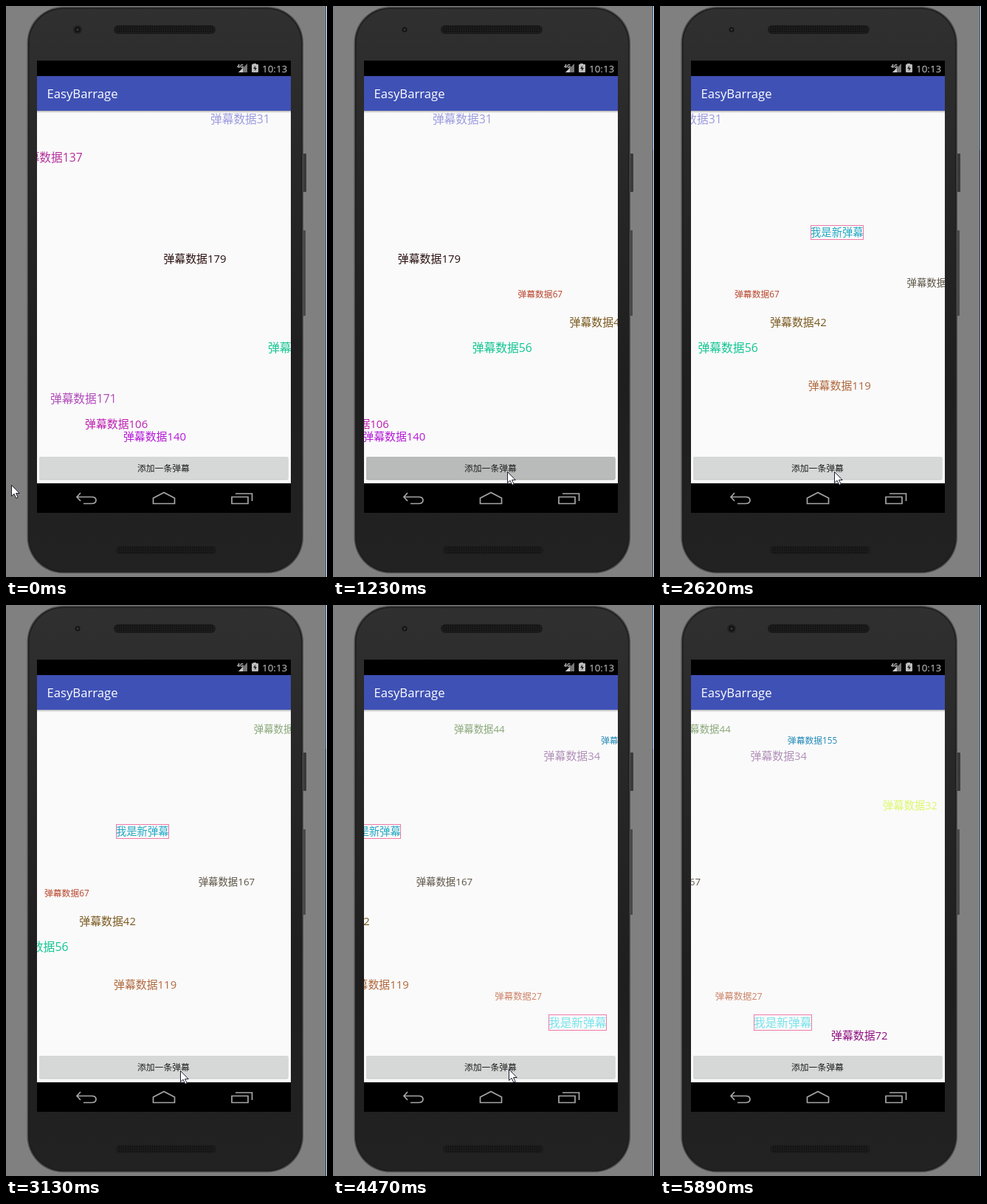
An HTML page with a canvas for the animation above (5.99 s loop, 435x774 px).

```html
<!DOCTYPE html>
<html lang="zh">
<head>
<meta charset="utf-8">
<style>
html, body { margin: 0; width: 435px; height: 774px; overflow: hidden; background: #808080; }
canvas { display: block; }
</style>
</head>
<body>
<canvas id="stage" width="435" height="774"></canvas>
<script>
const ctx = document.getElementById('stage').getContext('2d');
const LOOP = 5990;
const FONT = '"Open Sans", "Noto Sans CJK SC", "Noto Sans CJK", sans-serif';

const HOLDS = [[0, 1], [120, 7], [1090, 1], [1230, 1], [1390, 5], [2050, 1], [2200, 1],
  [2360, 6], [3130, 1], [3270, 1], [3390, 1], [3510, 3], [3900, 1], [4050, 3],
  [4470, 1], [4620, 7], [5590, 1], [5730, 1], [5890, 1], [LOOP, 1]];

// Left edge of a comment by its age: fast at first, then steady
const TRACK = [[0, 386], [300, 335.5], [590, 292], [1067, 227], [1637, 164],
  [2010, 127], [3057, 27], [5057, -158]];

const POINTER = [[0, 7, 649], [120, 7, 649], [1000, 236, 631], [4050, 236, 631],
  [4470, 238, 629], [5300, 238, 629], [5590, 300, 697], [5730, 380, 780]];

// [number, birth, centre y, size, colour]
const COMMENTS = [
  [137, -3198, 205, 15.7, '#b5309a'], [171, -2712, 532, 15.7, '#b04ab8'],
  [106, -2219, 566, 14.9, '#bc1eb0'], [140, -1688, 583, 14.9, '#b41ad8'],
  [179, -1190, 342, 14.9, '#2a1010'], [31, -700, 153, 15.7, '#9c9ce0'],
  [56, -184, 463, 15.8, '#12c592'], [67, 335, 391, 11.8, '#b8452c'],
  [42, 830, 428, 14.9, '#7a5a20'], [119, 1312, 514, 14.9, '#b0683c'],
  [167, 2310, 375, 13.4, '#5e5648'], [44, 2832, 168, 13.4, '#8aa87a'],
  [27, 3334, 530, 12.4, '#cc8468'], [34, 3833, 204, 14.9, '#b090b8'],
  [155, 4333, 184, 11.8, '#2288b8'], [72, 4860, 583, 14.9, '#901080'],
  [32, 5367, 272, 14.3, '#dcf86a'],
  ['', 1342, 307, 14.3, '#22a8c4'], ['', 3880, 566, 15.7, '#78e4ec']];

function lerpKeys(keys, t, col = 1) {
  let i = 1;
  while (i < keys.length - 1 && keys[i][0] < t) i++;
  const a = keys[i - 1], b = keys[i];
  const p = Math.min(1, (t - a[0]) / (b[0] - a[0]));
  return a[col] + (b[col] - a[col]) * p;
}

function heldTime(t) {
  const i = HOLDS.findIndex(h => h[0] > t) - 1;
  const [start, steps] = HOLDS[i];
  const len = (HOLDS[i + 1][0] - start) / steps;
  return start + Math.floor((t - start) / len) * len;
}

function rect(x, y, w, h, fill) {
  ctx.fillStyle = fill;
  ctx.fillRect(x, y, w, h);
}

function round(x, y, w, h, r, fill) {
  ctx.fillStyle = fill;
  ctx.beginPath();
  ctx.roundRect(x, y, w, h, r);
  ctx.fill();
}

function circle(x, y, r, fill) {
  ctx.fillStyle = fill;
  ctx.beginPath();
  ctx.arc(x, y, r, 0, 7);
  ctx.fill();
}

function text(str, x, y, size, fill) {
  ctx.font = `${size}px ${FONT}`;
  ctx.fillStyle = fill;
  ctx.fillText(str, x, y);
}

function line(path, color, width) {
  ctx.strokeStyle = color;
  ctx.lineWidth = width;
  ctx.stroke(new Path2D(path));
}

function vertical(y0, y1, ...colors) {
  const g = ctx.createLinearGradient(0, y0, 0, y1);
  colors.forEach((c, i) => g.addColorStop(i / (colors.length - 1), c));
  return g;
}

function speaker(x, y, w, h) {
  round(x, y, w, h, h / 2, '#1b1b1b');
  for (let i = 4; i < w - 4; i += 3)
    for (let j = 2; j < h - 2; j += 3) rect(x + i, y + j, 1, 1, '#050505');
}

function phone(ring) {
  rect(0, 0, 435, 774, '#808080');
  rect(433, 0, 1, 774, '#33557f');
  if (!ring) rect(433, 195, 1, 579, '#1d3450');
  rect(434, 0, 1, 774, '#e8eef5');
  round(402, 200, 5, 52, 1, '#3a3a3a');
  round(402, 304, 4, 116, 1, '#484848');
  round(28.5, 1, 374.5, 768, 49, '#4c4c4d');
  round(30, 2.5, 371.5, 765, 47.5, '#1c1c1c');
  round(31.5, 4, 368.5, 762, 46, vertical(0, 770, '#303031', '#262626', '#1e1e1e', '#222223'));
  if (ring) circle(97, 32, 6, '#222');
  circle(97, 32, ring ? 4 : 3.5, '#141414');
  circle(97, 32, 1.5, '#39393b');
  speaker(146, 26, 138, 12);
  speaker(149, 732, 136, 11);
}

function screen(pressed) {
  rect(42, 74, 344, 613, '#000');
  rect(42, 142, 344, 505, '#fafafa');
  rect(42, 95, 344, 47, '#3f51b5');
  rect(42, 142, 344, 3, vertical(142, 145, '#b0b0b0', '#fafafa'));
  text('EasyBarrage', 55.4, 125, 16.7, '#fff');
  text('10:13', 347, 89.5, 13.4, '#c8c8c8');

  ctx.fillStyle = '#777';
  ctx.fill(new Path2D('M315 90H327V78Z'));
  ctx.fillStyle = '#ccc';
  ctx.fill(new Path2D('M315 90H321V84Z'));
  ctx.font = `bold 7px ${FONT}`;
  ctx.fillText('4G', 313, 84);
  rect(335, 78, 4, 2, '#bbb');
  round(333, 79, 9, 11, 1, '#bbb');
  ctx.fillStyle = '#222';
  ctx.fill(new Path2D('M338 81L335 85H337V88L340 84H338Z'));

  round(45, 611.5, 337.5, 31, 2, pressed ? '#a5a6a6' : '#c8c9c9');
  round(45, 611, 337.5, 30.5, 2, pressed ? '#b9bbba' : '#d6d7d7');
  text('添加一条弹幕', 178, 631, 11.8, '#202020');

  line('M101 660L96 665.5L101 671M96 665.5H116Q122 665.5 122 670T116 674.5H105', '#a6a6a6', 1.7);
  line('M199.5 674.5V667L214 659.5L228.5 667V674.5Z', '#a6a6a6', 1.7);
  line('M306 665.5H328V674.5H306ZM311 661H333.5V671', '#a6a6a6', 1.7);
}

function comments(t) {
  ctx.save();
  ctx.beginPath();
  ctx.rect(42, 142, 344, 504);
  ctx.clip();
  for (const [num, birth, y, size, color] of COMMENTS) {
    if (t < birth) continue;
    const x = lerpKeys(TRACK, t - birth);
    text(num ? '弹幕数据' + num : '我是新弹幕', x, y + size * 0.37, size, color);
    if (!num) {
      const h = Math.round(size * 1.33);
      ctx.strokeStyle = '#f07aa8';
      ctx.lineWidth = 1;
      ctx.strokeRect(Math.floor(x) + 0.5, Math.floor(y - h / 2) + 0.5, Math.floor(size * 5), h);
    }
  }
  ctx.restore();
}

function pointer(t) {
  ctx.save();
  ctx.translate(Math.round(lerpKeys(POINTER, t)), Math.round(lerpKeys(POINTER, t, 2)));
  const arrow = 'M.5 .5V15.5L4 12.2L6.8 18.3L9.2 17.2L6.5 11.5H11.2Z';
  ctx.fillStyle = '#fff';
  ctx.fill(new Path2D(arrow));
  line(arrow, '#1c2030', 1);
  ctx.restore();
}

function draw(now) {
  const t = heldTime(now % LOOP);
  phone(t < 120 || t >= 5730);
  screen((t > 1200 && t < 1390) || (t > 3700 && t < 3900));
  comments(t);
  pointer(t);
  requestAnimationFrame(draw);
}
requestAnimationFrame(draw);
</script>
</body>
</html>
```
